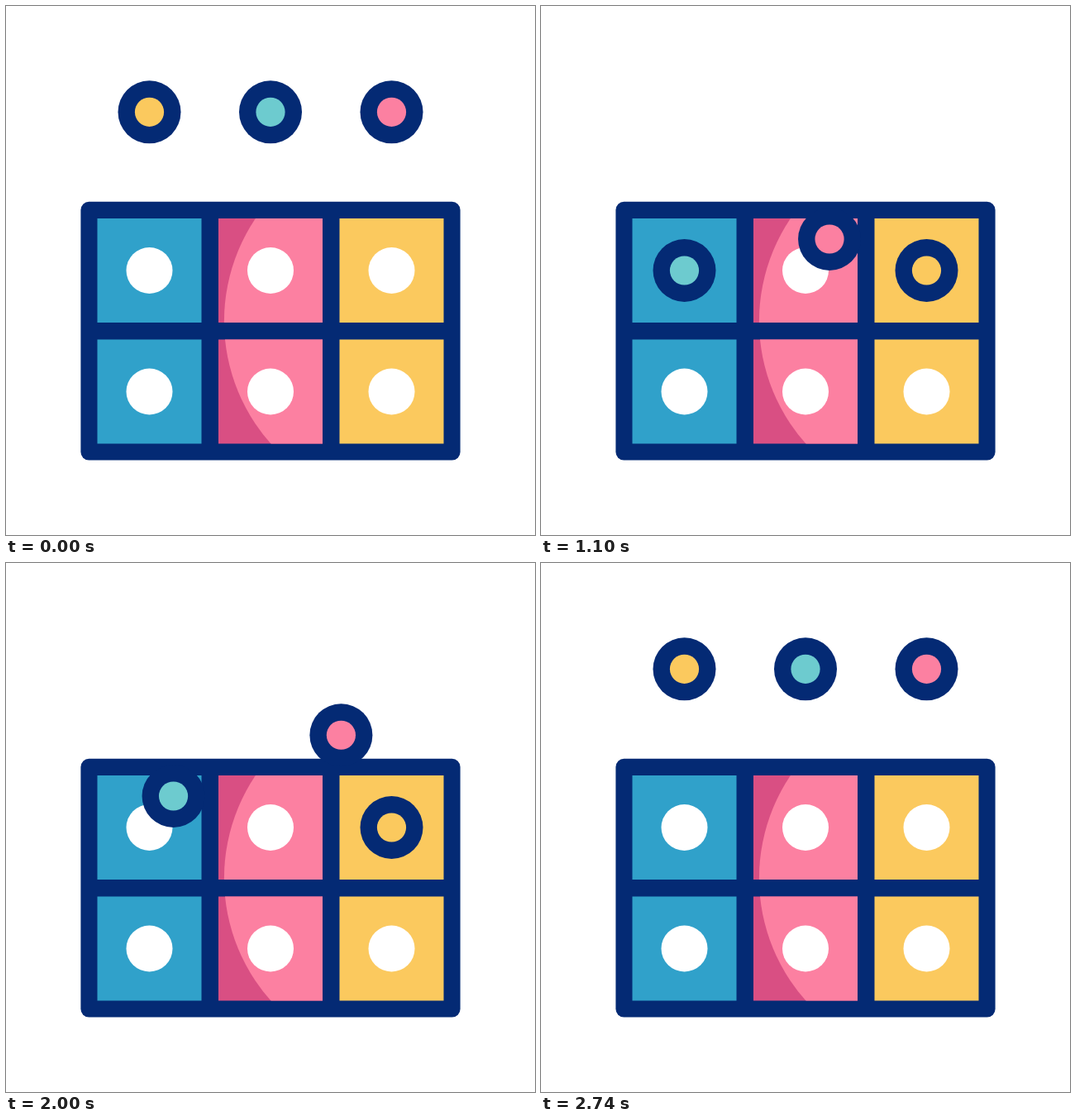
Animation, 640 px wide and 640 px high, one loop 3 s. Source, as an HTML page with a canvas:

```html
<!DOCTYPE html>
<html lang="en">
<head>
<meta charset="utf-8">
<title>Board game</title>
<style>
  html, body { margin: 0; width: 100%; height: 100%; overflow: hidden; background: #fff; }
  canvas { display: block; width: 640px; height: 640px; }
</style>
</head>
<body>
<canvas id="stage" width="640" height="640"></canvas>
<script>
const ctx = document.getElementById('stage').getContext('2d');

const LOOP = 3000;
const STEP = 20;
const COLUMNS = [173.5, 320, 466.5];
const ROWS = [320, 466.5];
const HOME_Y = 128.3;
const TILE = 126;

const NAVY = '#042a74';
const PINK = '#fc80a1';
const DARK_PINK = '#d94f83';
const YELLOW = '#fbc95e';
const BLUE = '#30a1ca';
const TEAL = '#6dcbcf';
const SPARK = '#fdca53';

// home and slot are column indices; out and back are [start, end] in ms
const balls = [
  { color: TEAL, home: 1, slot: 0, out: [200, 900], back: [1800, 2500] },
  { color: YELLOW, home: 0, slot: 2, out: [400, 1100], back: [2000, 2700] },
  { color: PINK, home: 2, slot: 1, out: [600, 1300], back: [1600, 2320] }
];

// outer end of each ray and its tilt from the vertical
const rays = [
  { x: 165.6, y: 118.3, tilt: -0.47 },
  { x: 320, y: 97, tilt: 0 },
  { x: 474.4, y: 118.3, tilt: 0.47 }
];
const RAY_LENGTH = 64;

function ease(time, [start, end]) {
  const s = Math.min(1, Math.max(0, (time - start) / (end - start)));
  return s * s * (3 - 2 * s);
}

const mix = (a, b, p) => a + (b - a) * p;

function disc(x, y, radius, color) {
  ctx.fillStyle = color;
  ctx.beginPath();
  ctx.arc(x, y, radius, 0, Math.PI * 2);
  ctx.fill();
}

function drawTile(x, y, column) {
  const left = x - TILE / 2;
  const top = y - TILE / 2;
  ctx.save();
  ctx.fillStyle = [BLUE, DARK_PINK, YELLOW][column];
  ctx.fillRect(left, top, TILE, TILE);
  if (column === 1) {
    ctx.beginPath();
    ctx.rect(left, top, TILE, TILE);
    ctx.clip();
    disc(486.3, 381.4, 222.4, PINK);
  }
  ctx.restore();
  disc(x, y, 28, '#fff');
}

function drawBoard() {
  ctx.fillStyle = NAVY;
  ctx.beginPath();
  ctx.roundRect(90.4, 236.8, 459.2, 312.8, 10);
  ctx.fill();
  ROWS.forEach(y => COLUMNS.forEach((x, column) => drawTile(x, y, column)));
}

function drawRays(time) {
  const head = ease(time, [1300, 1600]);
  const tail = ease(time, [1440, 1760]);
  if (head <= tail) return;
  ctx.strokeStyle = SPARK;
  ctx.lineWidth = 20.5;
  ctx.lineCap = 'round';
  for (const { x, y, tilt } of rays) {
    const at = p => {
      const rest = RAY_LENGTH * (1 - p);
      return [x - Math.sin(tilt) * rest, y + Math.cos(tilt) * rest];
    };
    ctx.beginPath();
    ctx.moveTo(...at(tail));
    ctx.lineTo(...at(head));
    ctx.stroke();
  }
}

function drawBall({ color, home, slot, out, back }, time) {
  const p = ease(time, out) - ease(time, back);
  const x = mix(COLUMNS[home], COLUMNS[slot], p);
  const y = mix(HOME_Y, ROWS[0], p);
  disc(x, y, 38, NAVY);
  disc(x, y, 17.6, color);
}

function frame(now) {
  const time = Math.floor((now % LOOP) / STEP) * STEP;
  ctx.fillStyle = '#fff';
  ctx.fillRect(0, 0, 640, 640);
  drawBoard();
  drawRays(time);
  balls.forEach(ball => drawBall(ball, time));
  requestAnimationFrame(frame);
}

frame(performance.now());
</script>
</body>
</html>
```
